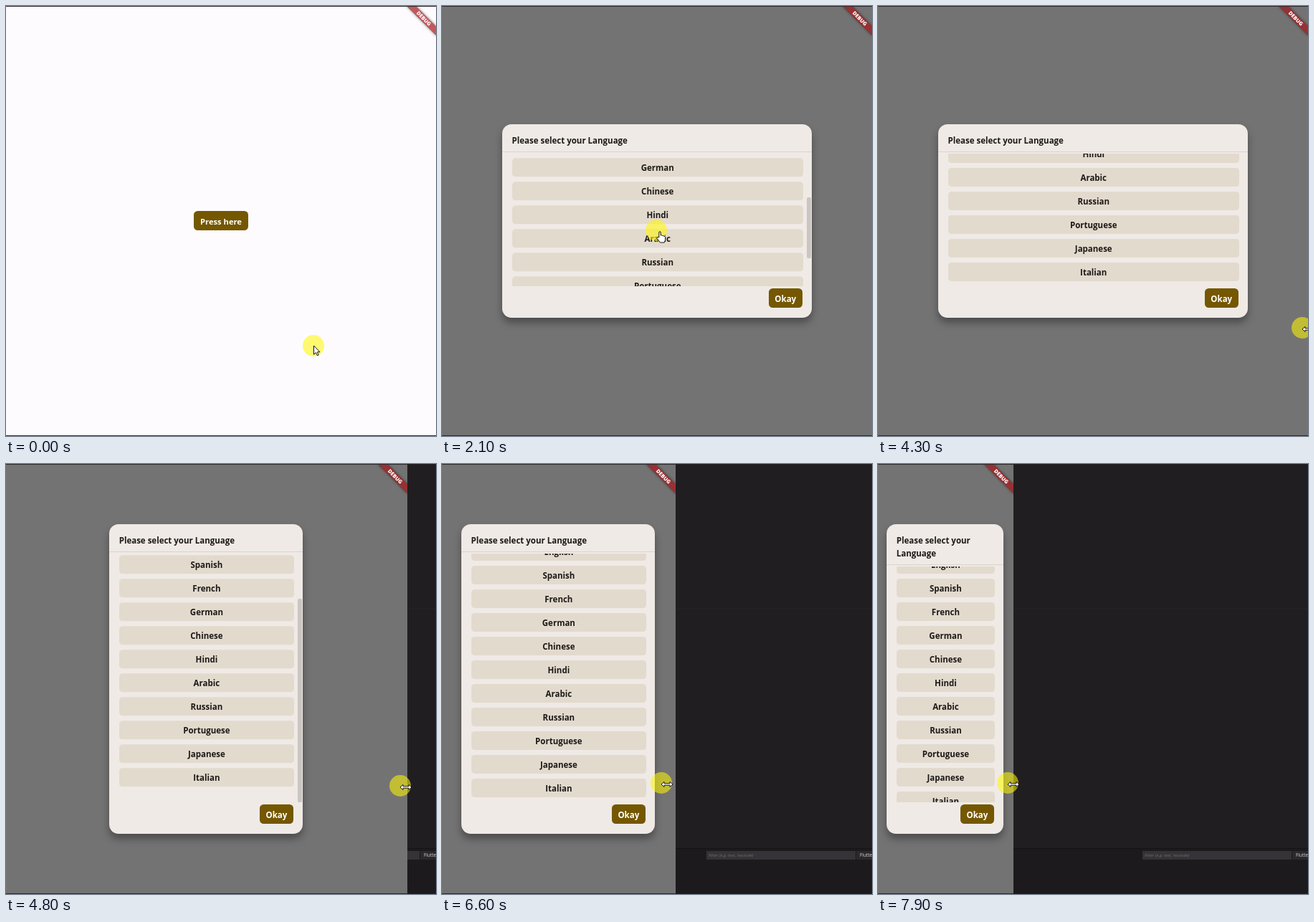
Write an HTML page that moves like this. It is 600x600 px and loops after 8000 ms.

```html
<!DOCTYPE html>
<html lang="en">
<head>
<meta charset="utf-8">
<title>Language dialog</title>
<style>
  * { box-sizing: border-box; }
  html, body { margin: 0; width: 100%; height: 100%; overflow: hidden; background: #201e21; }
  body, #stage { position: relative; }
  #stage { width: 600px; height: 600px; overflow: hidden; font: bold 11.5px "Open Sans", "Noto Sans", sans-serif; color: #1d1a17; }
  #stage div, #stage svg { position: absolute; }

  #tools { inset: 0; }
  #rule { top: 202px; width: 100%; height: 1px; background: #262427; }
  #bar { top: 536px; width: 100%; height: 64px; background: #1c1a1d; border-top: 1px solid #151316; }
  #filter, #tab { top: 540px; height: 12px; font-size: 6.5px; line-height: 12px; font-weight: 400; white-space: nowrap; }
  #filter { left: 369px; width: 208px; padding-left: 3px; background: #353337; color: #6f6d71; font-style: italic; font-size: 6px; }
  #tab { left: 578px; width: 60px; padding-left: 5px; background: #2b292c; color: #d5d3d6; }

  #app { left: 0; top: 0; height: 600px; overflow: hidden; background: #fdfbfe; }
  #edges { inset: 0; border: solid #2c2a2d; border-width: 1px 0; }
  #scrim { inset: 0; background: rgba(0, 0, 0, .54); }
  .button { height: 27px; border-radius: 5.5px; padding-top: 1.5px; background: #745700; color: #fff; line-height: 26px; text-align: center; }
  #press { top: 286.3px; width: 76px; font-size: 11.2px; }
  #okay { right: 13px; bottom: 13.5px; width: 47.5px; }

  #dialog { border-radius: 13px; background: #efeae6; box-shadow: 0 7px 11px rgba(0, 0, 0, .34); }
  #stage #title { position: relative; padding: 14px 13.5px 6px; line-height: 18px; border-bottom: 1px solid #d9d3ce; }
  #list { left: 0; right: 0; bottom: 43.5px; overflow: hidden; }
  #items { left: 14px; right: 12.5px; top: 0; padding-top: 7px; }
  #stage #items div { position: relative; height: 26.5px; margin-bottom: 6.5px; padding-top: 1.5px; border-radius: 4.5px; background: #e3dace; line-height: 26px; text-align: center; }
  #thumb { right: 1.5px; width: 5.5px; border-radius: 2px; background: rgba(80, 70, 65, .22); }

  #banner { right: -11.7px; top: 13px; width: 58px; height: 8.7px; transform: rotate(45deg); background: rgba(170, 20, 24, .7); box-shadow: 0 0 4px rgba(0, 0, 0, .5); color: #fff; font-size: 7.3px; font-weight: 800; line-height: 8.7px; text-align: center; }

  #pointer { width: 0; height: 0; }
  #glow { left: -15px; top: -15px; width: 30px; height: 30px; border-radius: 50%; background: rgba(255, 248, 0, .56); }
  #ring { border: 1px dashed #8d8620; border-radius: 50%; transform: translate(-50%, -50%); left: 2px; top: -2px; }
  #pointer svg { overflow: visible; fill: #fff; stroke: #111; stroke-width: 1; stroke-linejoin: round; }
</style>
</head>
<body>
<div id="stage">
  <div id="tools">
    <div id="rule"></div>
    <div id="bar"></div>
    <div id="filter">Filter (e.g. text, !exclude)</div>
    <div id="tab">Flutter</div>
  </div>
  <div id="app">
    <div id="press" class="button">Press here</div>
    <div id="scrim"></div>
    <div id="dialog">
      <div id="title">Please select your Language</div>
      <div id="list"><div id="items"></div><div id="thumb"></div></div>
      <div id="okay" class="button">Okay</div>
    </div>
    <div id="banner">DEBUG</div>
    <div id="edges"></div>
  </div>
  <div id="pointer">
    <div id="glow"></div>
    <div id="ring"></div>
    <svg id="arrow" width="1" height="1"><path d="M.5 0V12.2L3.4 9.6 5.3 13.8 7.2 13 5.4 8.8H9Z"/></svg>
    <svg id="hand" width="1" height="1"><path d="M3.8 9V2Q3.8.8 5 .8T6.2 2V6Q8 5.2 8.6 6.6 10 6 10.7 7.3 12.4 6.8 12.6 8.6V11.5Q12.5 14 11.2 16H5.4Q3.5 13.2 1 10.4.6 8.8 2 8.4 3 8.4 3.8 9Z"/></svg>
    <svg id="resize" width="1" height="1"><path d="M-8 0L-4-3.6V-1.2H4V-3.6L8 0 4 3.6V1.2H-4V3.6Z"/></svg>
  </div>
</div>
<script>
const LOOP = 8000, ROW = 33, CONTENT = 403;
const FLIP = 4480; // the dialog turns upright here
const $ = id => document.getElementById(id);
const languages = "Bangle English Spanish French German Chinese Hindi Arabic Russian Portuguese Japanese Italian";
for (const name of languages.split(" ")) {
  $("items").appendChild(document.createElement("div")).textContent = name;
}

const clamp = v => Math.min(1, Math.max(0, v));
const ramp = (t, from, to) => clamp((t - from) / (to - from));
const smooth = u => u * u * (3 - 2 * u);

// Keys are [time, value]
function track(keys, t, ease = u => u) {
  const i = keys.findIndex(k => k[0] > t);
  if (i === 0) return keys[0][1];
  if (i < 0) return keys[keys.length - 1][1];
  const [a, b] = [keys[i - 1], keys[i]];
  return a[1] + (b[1] - a[1]) * ease(ramp(t, a[0], b[0]));
}

const widthKeys = [[4350, 600], [4480, 594], [4800, 560], [5300, 517], [5700, 473], [5800, 463],
  [6200, 397], [6600, 326], [7000, 261], [7350, 215], [7600, 194], [7800, 189]];
const lagKeys = [[4350, 8], [4800, 10], [5800, 17], [6600, 20], [7200, 17], [7800, 8]];
const xKeys = [[100, 429], [900, 299], [2750, 299], [3100, 630], [3300, 630], [3600, 507], [3800, 592]];
const yKeys = [[100, 474], [900, 313], [2000, 313], [2700, 319], [3100, 440], [3800, 448],
  [4800, 449], [5800, 450], [6600, 445]];

function scrollAt(t) {
  if (t < FLIP) return 218 * smooth(ramp(t, 1700, 2400));
  const s = (t - FLIP) / 1000; // overdamped spring back to the end of the list
  return 56 + 162 * (1.69 * Math.exp(-9.07 * s) - .69 * Math.exp(-22 * s));
}

function place(id, box) {
  for (const key in box) $(id).style[key] = box[key] + "px";
}
const fade = (id, opacity) => { $(id).style.opacity = opacity; };

function draw(t) {
  const upright = t >= FLIP;
  const width = track(widthKeys, t);
  const center = width / 2 - (width < 600 ? .8 : 0);
  place("app", { width });
  place("press", { left: center - 38 });

  const open = ramp(t, 1000, 1150);
  fade("scrim", open);
  fade("dialog", open);
  const w = upright ? Math.min(270, width - 26) : 432;
  const h = upright ? 432 : 270;
  place("dialog", { left: center - w / 2, top: 299.8 - h / 2, width: w, height: h });

  const top = $("title").offsetHeight + 2.2;
  const view = h - 43.5 - top;
  const scroll = scrollAt(t);
  place("list", { top });
  $("items").style.transform = `translateY(${-scroll}px)`;

  const over = Math.max(0, scroll - (CONTENT - view));
  const size = Math.max(18, view * view / CONTENT - over);
  const ratio = clamp(scroll / (CONTENT - view));
  place("thumb", { height: size, top: (view - size) * ratio });
  fade("thumb", upright ? 1 - ramp(t, 5650, 6000) : ramp(t, 1700, 1850) * (1 - ramp(t, 2850, 3100)));

  const resizing = t >= 3750;
  const x = t < 4350 ? track(xKeys, t, smooth) : width - track(lagKeys, t);
  const y = track(yKeys, t, smooth);
  place("pointer", { left: x, top: y });
  const onButton = t < 1000 && Math.abs(x - 300) < 38 && Math.abs(y - 300) < 14;
  const onList = t >= 1000 && x > 98 && x < 504;
  const shape = resizing ? "resize" : onButton || onList ? "hand" : "arrow";
  for (const id of ["arrow", "hand", "resize"]) $(id).style.display = id === shape ? "" : "none";
  place("hand", { left: 0, top: 1 });
  place("arrow", { left: 0, top: -.5 });
  place("resize", { left: 8, top: 2.3 });

  const click = ramp(t, 950, 1350);
  place("ring", { width: 4 + 17 * click, height: 4 + 17 * click });
  fade("ring", click > 0 && click < 1 ? 1 : 0);
}

function tick() {
  draw(performance.now() % LOOP);
  requestAnimationFrame(tick);
}
tick();
</script>
</body>
</html>
```
